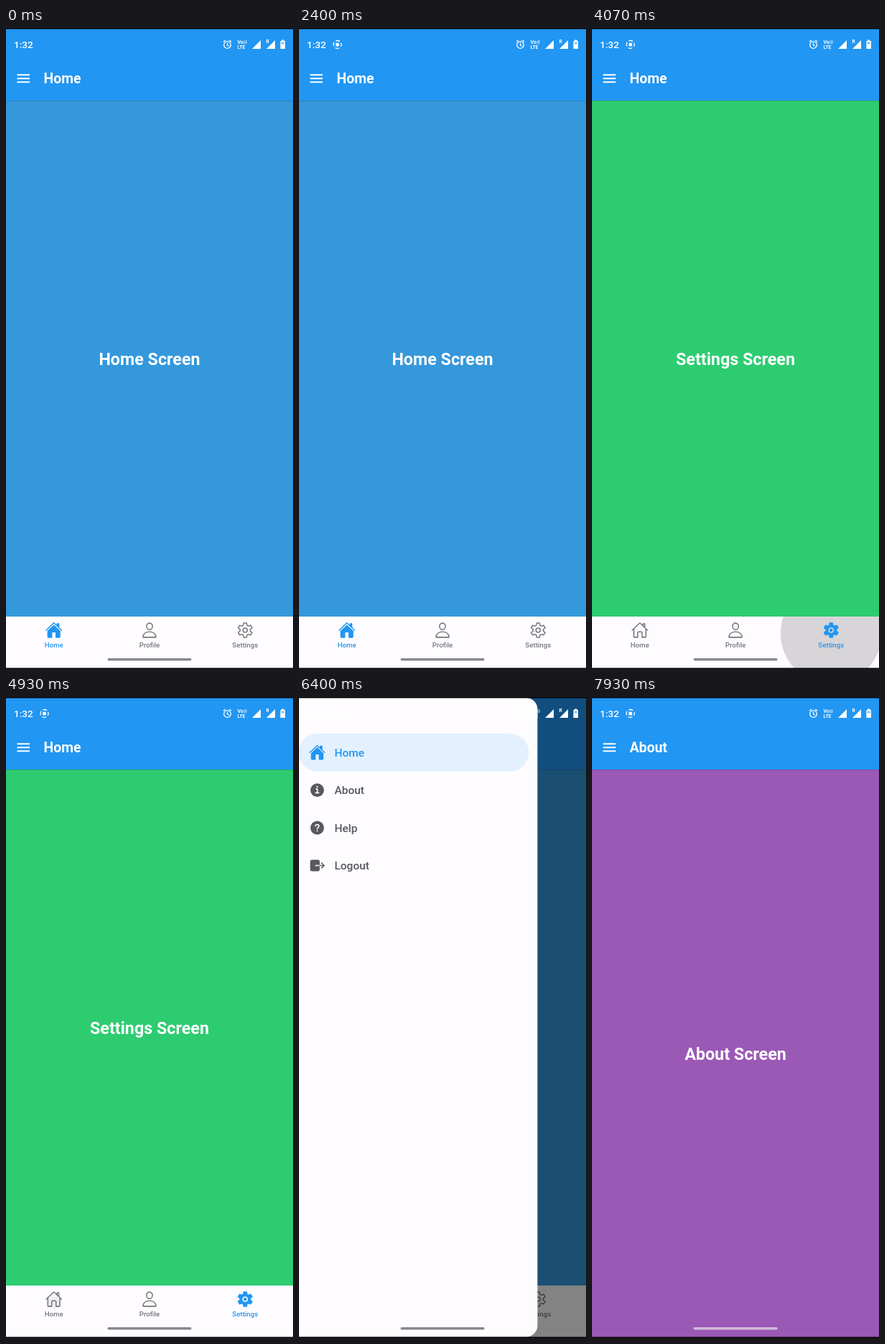
An HTML page that plays this animation: 400 px wide and 892 px high, repeating every 8000 ms.

```html
<!DOCTYPE html>
<html lang="en">
<head>
<meta charset="utf-8">
<title>Tabs and drawer</title>
<style>
  html, body { margin: 0; width: 100%; height: 100%; overflow: hidden; background: #000; }
  svg { display: block; width: 400px; height: 892px; font-family: Roboto, sans-serif; }
</style>
</head>
<body>
<svg id="stage" viewBox="0 0 400 892"></svg>
<script>
const LOOP = 8000, BLUE = '#2196f3', PAPER = '#fefcff', DRAWER = 345, ROW = 52.4;
const SCREENS = { Home: '#3498db', Profile: '#e74c3c', Settings: '#2ecc71', About: '#9b59b6' };
const TABS = ['Home', 'Profile', 'Settings'];
const ITEMS = ['Home', 'About', 'Help', 'Logout'];
const TAPS = [[0, 'Home'], [2870, 'Profile'], [3620, 'Settings'], [4970, 'Home'], [7168, 'About']];
const OPEN_AT = 6145, CLOSE_AT = 7168;

const tabX = i => 66.7 + 133.3 * i;
const rowY = i => 51 + ROW * (i + 0.5);

// Text whose capitals are centred on y.
const text = (x, y, size, weight, str, attrs = '') =>
  `<text x="${x}" y="${y + size * 0.356}" font-size="${size}" font-weight="${weight}" ${attrs}>${str}</text>`;
const MIDDLE = 'text-anchor="middle"';

function gearPath() {
  const points = [];
  for (let k = 0; k < 6; k++)
    for (const [r, offset] of [[150, -22], [216, -11], [216, 11], [150, 22]]) {
      const a = (k * 60 + offset) * Math.PI / 180;
      points.push((256 + r * Math.sin(a)).toFixed(1) + ' ' + (256 - r * Math.cos(a)).toFixed(1));
    }
  return 'M' + points.join('L') + 'Z';
}
const disc = r => `M${256 - r} 256a${r} ${r} 0 1 0 ${2 * r} 0a${r} ${r} 0 1 0 ${-2 * r} 0z`;

const line = d => `<path d="${d}" fill="none" stroke="currentColor" stroke-width="32" stroke-linecap="round" stroke-linejoin="round"/>`;
const solid = d => `<path d="${d}" fill="currentColor" fill-rule="evenodd"/>`;
const cut = d => `<path d="${d}" fill="none" stroke="${PAPER}" stroke-width="36" stroke-linecap="round" stroke-linejoin="round"/>`;
const person = line('M344 144c-4 53-44 96-88 96s-84-43-88-96c-4-55 35-96 88-96s92 42 88 96z'
  + 'M256 304c-87 0-175 48-192 139-2 11 4 21 16 21h352c11 0 18-10 16-21C431 352 343 304 256 304z');
const info = solid(disc(208)) + cut('M220 220h40v116M208 340h96')
  + `<circle cx="256" cy="152" r="26" fill="${PAPER}"/>`;

const ICONS = {
  Home: {
    off: line('M80 212v236a16 16 0 0 0 16 16h96V328a24 24 0 0 1 24-24h80a24 24 0 0 1 24 24v136h96a16 16 0 0 0 16-16V212'
      + 'M480 256L267 52c-5-5-17-5-22 0L32 256M400 179V64h-48v69'),
    on: solid('M262 101a8 8 0 0 0-12 0L66 277a8 8 0 0 0-2 6v165a32 32 0 0 0 32 32h96a16 16 0 0 0 16-16V328a8 8 0 0 1 8-8h80a8 8 0 0 1 8 8v136a16 16 0 0 0 16 16h96a32 32 0 0 0 32-32V283a8 8 0 0 0-2-6z')
      + solid('M491 244l-75-71V64a16 16 0 0 0-16-16h-48a16 16 0 0 0-16 16v32l-58-55c-12-12-32-12-44 0L21 244c-14 14 6 38 22 24L250 69a8 8 0 0 1 12 0l207 199a16 16 0 0 0 22-24z')
  },
  Profile: { off: person, on: person.replace('fill="none"', 'fill="currentColor"') },
  Settings: {
    off: line(gearPath()) + line(disc(64)),
    on: `<path d="${gearPath() + disc(80)}" fill="currentColor" fill-rule="evenodd"/>`
      + line(gearPath()) + solid(disc(48))
  },
  About: { off: info, on: info },
  Help: {
    off: solid(disc(208)) + cut('M200 203c1-58 110-62 110 0 0 44-54 42-54 88')
      + `<circle cx="256" cy="350" r="22" fill="${PAPER}"/>`
  },
  Logout: {
    off: solid('M96 80h180a56 56 0 0 1 56 56v104H192v32h140v104a56 56 0 0 1-56 56H96a56 56 0 0 1-56-56V136a56 56 0 0 1 56-56z')
      + line('M336 256h126M390 176l80 80-80 80')
  }
};
const icon = (name, state, x, y, size) =>
  `<g transform="translate(${x - size / 2} ${y - size / 2}) scale(${size / 512})">${ICONS[name][state]}</g>`;

// A pair of looks, one of which is shown at a time.
const toggle = (id, draw, idle) =>
  `<g id="${id}-off" color="${idle}" fill="${idle}">${draw('off')}</g>` +
  (ICONS[id.split('-')[1]].on ? `<g id="${id}-on" color="${BLUE}" fill="${BLUE}">${draw('on')}</g>` : '');

const tabs = TABS.map((name, i) => toggle('tab-' + name, state =>
  icon(name, state, tabX(i), 838, 24.3) + text(tabX(i), 859, 9.7, 500, name, MIDDLE), '#77767a')).join('');
const items = ITEMS.map((name, i) => toggle('item-' + name, state =>
  icon(name, state, 38, rowY(i), 23.3) + text(62, rowY(i), 15.5, 500, name), '#59585c')).join('');

const RIPPLES = [
  ...[2765, 3515, 4865].map((start, k) => {
    const x = tabX([1, 2, 0][k]);
    return { start, x, y: 842.5, r: 70.5, alpha: 0.26, shape: `<circle cx="${x}" cy="842.5" r="70.5"`, layer: 'tabs' };
  }),
  { start: 6080, x: 24, y: 70, r: 21, alpha: 0.28, shape: '<circle cx="24" cy="70" r="21"', layer: 'header' },
  { start: 7040, x: 173, y: rowY(1), r: 163, alpha: 0.31, layer: 'drawer',
    shape: `<rect x="12" y="${rowY(1) - ROW / 2}" width="321" height="${ROW}" rx="26"` }
];
const ripples = layer => RIPPLES.map((r, i) =>
  r.layer === layer ? `${r.shape} id="ripple${i}" fill="url(#soft${i})"/>` : '').join('');
const softEdge = [[1 / 3, 1], [1 / 2, 0.844], [2 / 3, 0.5], [5 / 6, 0.156], [1, 0]]
  .map(([at, a]) => `<stop offset="${at}" stop-opacity="${a}"/>`).join('');

const statusBar = `<g fill="#fff" stroke="none">
  ${text(11, 23.5, 13.6, 500, '1:32')}
  <g id="record" fill="none" stroke="#fff" stroke-width="1.3">
    <circle cx="53.5" cy="23" r="5.5" stroke-dasharray="6.2 2.44" stroke-dashoffset="3.1"/>
    <circle cx="53.5" cy="23" r="2.6" fill="#fff" stroke="none"/>
  </g>
  <g fill="none" stroke="#fff" stroke-width="1.3">
    <circle cx="308.5" cy="23.5" r="4.8"/>
    <path d="M308.5 20.5v3.3l2.2 1.4M303 19.3l2.8-2.3M314 19.3l-2.8-2.3"/>
    <path d="M332 17.8q1.6 1.6 0 4M334 17q2.2 2.4 0 5.4" stroke-width="0.9"/>
  </g>
  ${text(322.5, 20, 7, 700, 'Vo')}${text(322.5, 27, 6.6, 700, 'LTE')}
  <path d="M355 17v12h-12zM375 17v12h-12z"/>
  <rect x="361.5" y="15" width="6" height="7" fill="${BLUE}" id="notch"/>
  ${text(362.5, 18.5, 6.6, 700, 'R')}
  <path d="M384 16.5h3.4v1.5h1.6v11h-6.6v-11h1.6z"/>
  <path d="M383.6 19.5h4.2v3h-4.2z" fill="${BLUE}" opacity=".55"/>
</g>`.replace(/<rect[^>]*notch[^>]*>/, '');

const stage = document.getElementById('stage');
stage.innerHTML = `
<defs>
  ${RIPPLES.map((r, i) => `<radialGradient id="soft${i}" gradientUnits="userSpaceOnUse" cx="${r.x}" cy="${r.y}" r="1">${softEdge}</radialGradient>`).join('')}
  <clipPath id="bar"><rect y="819" width="400" height="72"/></clipPath>
</defs>
<rect id="body" y="101" width="400" height="790"/>
<g fill="#fff">${text(200, 461, 23.3, 700, '', MIDDLE + ' id="label"')}</g>
<rect width="400" height="101" fill="${BLUE}"/>
<rect y="101" width="400" height="1.2" opacity=".12"/>
${ripples('header')}
<path d="M15.5 65.2h17.5M15.5 70.2h17.5M15.5 75.2h17.5" stroke="#fff" stroke-width="2"/>
<g fill="#fff">${text(52.5, 70.5, 19.4, 700, '', 'id="title"')}</g>
<g id="tabs" clip-path="url(#bar)">
  <rect y="819" width="400" height="72" fill="${PAPER}"/>
  ${ripples('tabs')}${tabs}
</g>
<rect id="shade" width="400" height="892"/>
<g id="drawer">
  <rect x="-20" y="1" width="${DRAWER + 20}" height="889.5" rx="16" fill="${PAPER}"/>
  <rect id="pill" x="12" width="321" height="${ROW}" rx="26" fill="#e3f1fe"/>
  ${ripples('drawer')}${items}
</g>
${statusBar}
<rect id="handle" x="141.5" y="877" width="117" height="3.4" rx="1.7"/>
<path d="M0 0h400v1.5H0zM0 890.5h400v1.5H0z"/>`;

const el = id => document.getElementById(id);
const set = (id, attrs) => { for (const k in attrs) el(id).setAttribute(k, attrs[k]); };
const show = (id, visible) => { if (el(id)) el(id).style.display = visible ? '' : 'none'; };
const clamp = v => Math.min(1, Math.max(0, v));

// cubic-bezier(.4, 0, .2, 1)
function ease(x) {
  let lo = 0, hi = 1, s;
  for (let i = 0; i < 20; i++) {
    s = (lo + hi) / 2;
    if (1.2 * s * (1 - s) ** 2 + 0.6 * s * s * (1 - s) + s ** 3 < x) lo = s; else hi = s;
  }
  return 3 * s * s * (1 - s) + s ** 3;
}

// Critically damped spring from 0 to 1.
function spring(ms) {
  const s = Math.max(0, ms) * 0.02;
  return 1 - (1 + s) * Math.exp(-s);
}

function drawRipple({ start, r, alpha }, i, t) {
  const age = t - start;
  const p = age < 450 ? ease(clamp(age / 450)) / 2 : 0.5 + clamp((age - 450) / 375) / 2;
  const fade = Math.min(clamp(p / 0.13), 1 - clamp((p - 0.4) / 0.6));
  set('soft' + i, { r: Math.max(0.1, 6 * r * p) });
  set('ripple' + i, { opacity: age > 0 ? alpha * fade : 0 });
}

function draw(t) {
  const screen = TAPS.filter(([at]) => at <= t).pop()[1];
  const about = screen === 'About';
  const page = about ? 'About' : 'Home';

  set('body', { fill: SCREENS[screen] });
  el('label').textContent = screen + ' Screen';
  set('label', { y: (about ? 496.5 : 461) + 23.3 * 0.356 });
  el('title').textContent = page;
  show('tabs', !about);

  for (const [group, names, active] of [['tab', TABS, screen], ['item', ITEMS, page]])
    for (const name of names) {
      show(`${group}-${name}-on`, name === active);
      show(`${group}-${name}-off`, name !== active);
    }

  const open = spring(t - OPEN_AT) - spring(t - CLOSE_AT);
  set('drawer', { transform: `translate(${-DRAWER * (1 - open)} 0)` });
  show('drawer', open > 0.001);
  set('shade', { opacity: open * 0.5 });
  set('pill', { y: 51 + ROW * ITEMS.indexOf(page) });

  RIPPLES.forEach((r, i) => drawRipple(r, i, t));
  set('record', { opacity: clamp((t - 250) / 200) });
  set('handle', { fill: t > 7900 ? '#d3bcdc' : '#8b898d' });
}

function tick() {
  draw(performance.now() % LOOP);
  requestAnimationFrame(tick);
}
tick();
</script>
</body>
</html>
```
